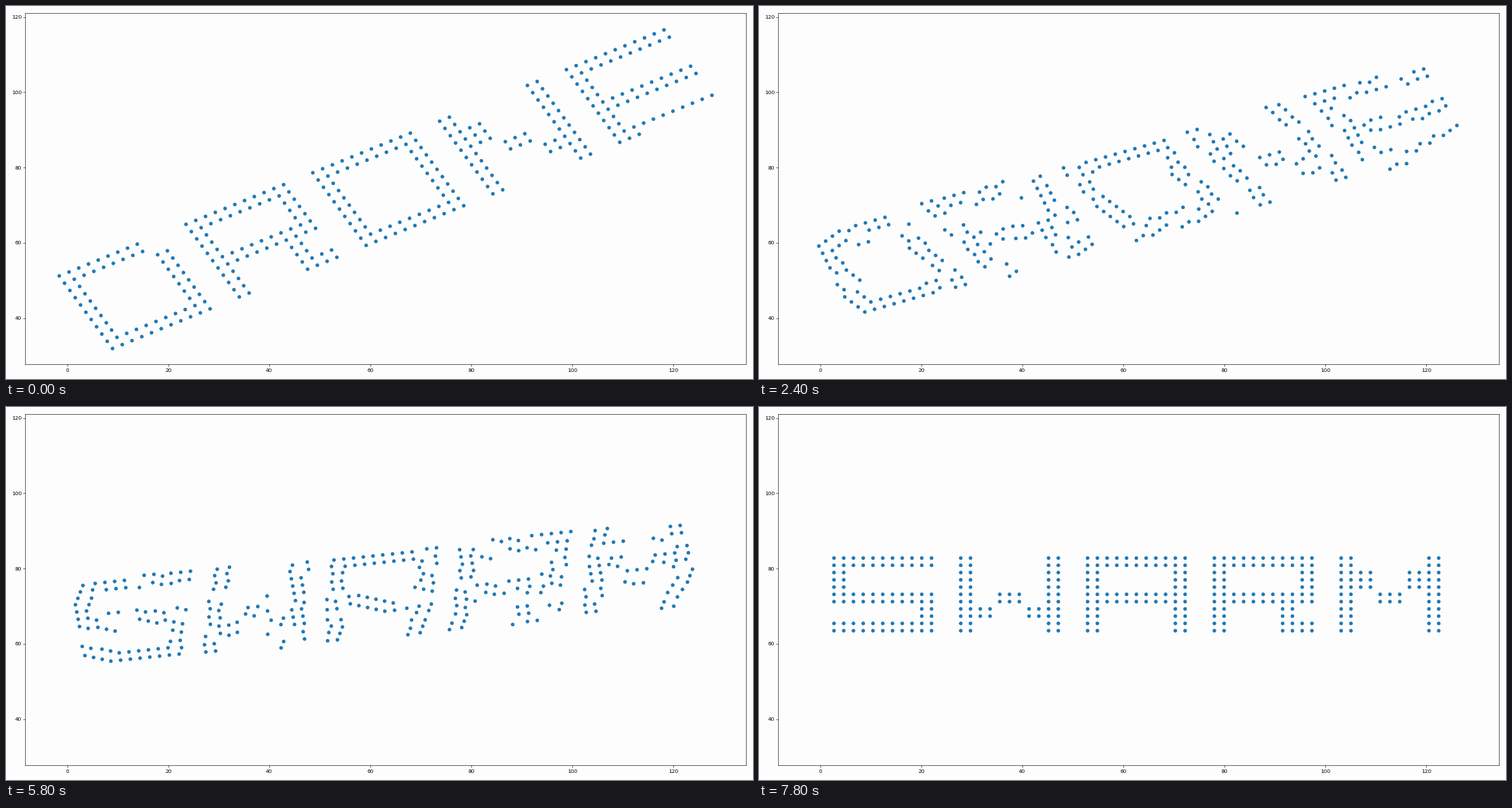
A matplotlib script that plays this animation: 1058 px wide and 529 px high, repeating every 8000 ms.

```python
import numpy as np
import matplotlib.pyplot as plt
from matplotlib.animation import FuncAnimation

W, H = 1058, 529
FRAMES, INTERVAL = 40, 200
STEP = 1.93        # dot spacing of the level word
TILT = 0.5         # rotation of the first word, radians
PITCH = 13         # columns from one letter to the next

GLYPHS = {
    "D": "####. #...# #...# #...# #####",
    "R": "##### #...# ##### #..#. #..##",
    "O": "##### #...# #...# #...# #####",
    "N": "#...# ##..# #.#.# #..## #...#",
    "E": "##### #.... ##### #.... #####",
    "S": "##### #.... ##### ....# #####",
    "W": "#...# #...# #.#.# ##.## #...#",
    "A": "##### #...# ##### #...# #...#",
    "M": "#...# ##.## #.#.# #...# #...#",
}


def word_cells(word):
    """Column and row of every dot, each 5x5 letter widened to 11x11."""
    cells = []
    for k, letter in enumerate(word):
        grid = np.array([list(row) for row in GLYPHS[letter].split()]) == "#"
        grid = np.repeat(grid, [2, 3, 2, 2, 2], axis=0)
        grid = np.repeat(grid, [2, 2, 3, 2, 2], axis=1)
        rows, cols = np.nonzero(grid)
        cells.append(np.column_stack([cols + PITCH * k, rows]))
    return np.vstack(cells).astype(float)


def place(cells, origin, angle=0.0):
    """Map cells to data units; the tilted grid keeps its horizontal spacing."""
    x, y = cells[:, 0], -cells[:, 1]
    t = np.tan(angle)
    return np.array(origin) + STEP * np.column_stack([x - t * y, y + t * x])


def assign(cost):
    """Cheapest one-to-one pairing by shortest augmenting paths."""
    n = len(cost)
    u, v = np.zeros(n), np.zeros(n)
    row_of, col_of = np.full(n, -1), np.full(n, -1)
    for start in range(n):
        dist, prev = np.full(n, np.inf), np.full(n, -1)
        free = np.ones(n, bool)
        i, low = start, 0.0
        while True:
            reach = low + cost[i] - u[i] - v
            better = free & (reach < dist)
            dist[better] = reach[better]
            prev[better] = i
            j = int(np.argmin(np.where(free, dist, np.inf)))
            low = dist[j]
            free[j] = False
            if row_of[j] < 0:
                break
            i = row_of[j]
        done = np.flatnonzero(~free & (row_of >= 0))
        gap = low - dist[done]
        u[start] += low
        u[row_of[done]] += gap
        v[done] -= gap
        while True:
            i = prev[j]
            row_of[j] = i
            col_of[i], j = j, col_of[i]
            if i == start:
                break
    return col_of


first, last = word_cells("DRONE"), word_cells("SWARM")
count = min(len(first), len(last))
begin = place(first[:count], (-1.55, 51.2), TILT)
end = place(last[:count], (2.75, 82.79))
cost = ((begin[:, None] - end[None]) ** 2).sum(axis=2)
end = end[assign(cost)]

# Axes box in pixels, and the data scale that puts the ticks in place
LEFT, RIGHT, TOP, BOTTOM = 27.1, 1047.5, 10.4, 508.4


def to_x(px):
    return (px - 86.5) / 7.158


def to_y(px):
    return 40 + (442.6 - px) / 5.3375


fig = plt.figure(figsize=(20, 10), dpi=52.9, facecolor="#fdfdfd")
ax = fig.add_axes([LEFT / W, 1 - BOTTOM / H, (RIGHT - LEFT) / W, (BOTTOM - TOP) / H],
                  facecolor="#fdfdfd")
# One colour per dot keeps the renderer from rounding dots to whole pixels
dots = ax.scatter(begin[:, 0], begin[:, 1], s=36, color=["#1f77b4"] * count, linewidths=1)
ax.set_xlim(to_x(LEFT), to_x(RIGHT))
ax.set_ylim(to_y(BOTTOM), to_y(TOP))
ax.set_xticks(range(0, 121, 20))
ax.set_yticks(range(40, 121, 20))


def update(i):
    t = i / (FRAMES - 1)
    dots.set_offsets(begin + t * (end - begin))
    return (dots,)


anim = FuncAnimation(fig, update, frames=FRAMES, interval=INTERVAL, repeat=True)
plt.show()
```
